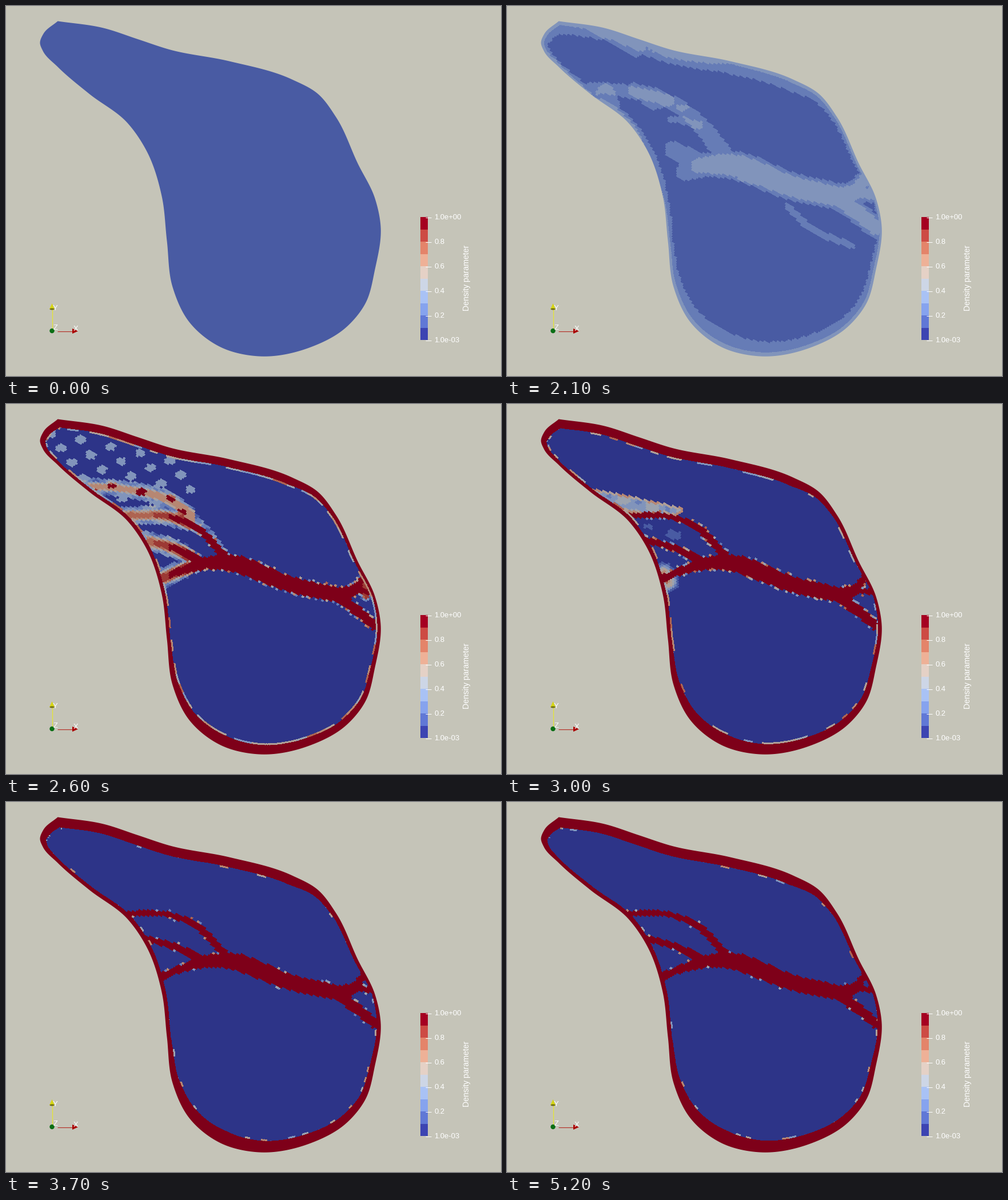
A matplotlib script for the animation above (8300 ms loop, 866 by 647 pixels).

```python
import numpy as np
import matplotlib.pyplot as plt
from matplotlib.animation import FuncAnimation
from matplotlib.colors import to_rgb
from matplotlib.patches import Circle, Ellipse, PathPatch, Polygon, Rectangle
from matplotlib.path import Path

W, H, DPI = 866, 647, 64
STEP, LOOP = 100, 8300
X0, X1, Y0, Y1 = 50, 666, 18, 622
BACK = "#c5c4b8"
BAR = ["#3c44b2", "#6078d6", "#86a3ee", "#a9c2f5", "#cdd6e6",
       "#e5d1c6", "#eeb197", "#e4846a", "#cd4b44", "#a50021"]
SHADE = 0.765  # the body is lit a little darker than its colour bar
PALETTE = np.array([to_rgb(c) for c in BAR]) * SHADE

# the solver saves a picture at these times; the field runs from 0 to 6
TIMES = np.array([0, 20, 21, 23, 24, 26, 29, 30, 31, 33, 35, 37, 39, 40,
                  43, 45, 48, 50, 51, 52]) * 100
POSITIONS = np.interp(TIMES, [1999, 2000, 2300, 2600, 3000, 3700, 5200], range(7))

BODY = [(90, 26), (170, 38), (230, 57.5), (285, 75.5), (390, 96), (500, 128),
        (545, 153), (577, 194), (615, 275), (645, 336), (655, 385), (645, 460),
        (628, 520), (595, 561), (530, 597), (442, 612), (375, 596), (320, 552),
        (291, 491), (281, 410), (272, 332), (245, 252), (212, 204), (145, 153),
        (90, 106), (64, 78), (59, 64), (65, 48), (90, 26)]

# struts as key points (x, y, half width)
TRUNK = [(335, 279, 9), (385, 277, 14), (500, 316, 14), (592, 336, 13)]
FORK = [[(590, 333, 12), (615, 319, 8), (624, 304, 5)],
        [(605, 325, 6), (640, 329, 5)],
        [(588, 342, 10), (615, 362, 9), (645, 388, 8)]]
UPPER = [(208, 195, 5), (285, 197, 5), (330, 214, 6), (382, 266, 7)]
MID = [(240, 238, 6), (290, 251, 6), (345, 277, 9)]
LOW = [(268, 307, 7), (310, 290, 7), (345, 280, 11)]
VEIN = [(145, 143, 3), (215, 150, 4), (285, 168, 5), (335, 205, 7), (385, 268, 9)]
SPUR = [(490, 350, 2), (530, 387, 3), (605, 420, 2)]
RIBS = [UPPER, MID, LOW]
SPINE = [TRUNK, *FORK]


def smooth(knots, sub):
    """Hermite curve through the knots, sub samples per span."""
    knots = np.array(knots, float)
    t = np.r_[0, np.cumsum(np.hypot(*np.diff(knots[:, :2], axis=0).T))]
    slope = np.gradient(knots, t, axis=0)
    s = (np.arange(sub) / sub)[None, :, None]
    h = np.diff(t)[:, None, None]
    p, q = knots[:-1, None], knots[1:, None]
    m, n = slope[:-1, None] * h, slope[1:, None] * h
    curve = ((2 * s**3 - 3 * s**2 + 1) * p + (s**3 - 2 * s**2 + s) * m
             + (3 * s**2 - 2 * s**3) * q + (s**3 - s**2) * n)
    return np.vstack([curve.reshape(-1, knots.shape[1]), knots[-1:]])


SUB = 20
outline = smooth(BODY, SUB)[:-1] + 0.5
knot = np.arange(len(outline)) / SUB


def bump(centre, spread):
    return np.exp(-((knot - centre) / spread) ** 2)


# rim thickness along the outline, final and early, with two late-filling gaps
wide = np.interp(knot, [0, 5, 7, 9, 11, 13, 16, 17, 19, 22, 24, 28],
                 [17.5, 17.5, 8, 5, 9, 15, 24, 19, 7, 8, 6, 17])
thin = 2 + 0.22 * wide
gap = 10 * (bump(3, 0.8) + bump(21.5, 1.3))

# pixel grid, distance to the outline and nearest outline sample
px, py = np.meshgrid(np.arange(X0, X1) + 0.5, np.arange(Y0, Y1) + 0.5)
px, py = px.astype(np.float32), py.astype(np.float32)
dist = np.full(px.shape, 1e9, np.float32)
near = np.zeros(px.shape, np.int32)
for i, (ox, oy) in enumerate(outline.astype(np.float32)):
    d2 = (px - ox) ** 2 + (py - oy) ** 2
    closer = d2 < dist
    np.copyto(dist, d2, where=closer)
    np.copyto(near, i, where=closer)
dist = np.sqrt(dist)

# tilted brick mesh
CW, CH, TILT = 4.4, 3.8, np.radians(30)
ca, sa = np.cos(TILT), np.sin(TILT)
row = np.floor((py * ca - px * sa) / CH).astype(int)
col = np.floor((px * ca + py * sa) / CW + row % 2 / 2).astype(int)
rows, cols = np.mgrid[row.min():row.max() + 1, col.min():col.max() + 1]
row, col = row - row.min(), col - col.min()
cu, cv = (cols + 0.5 - rows % 2 / 2) * CW, (rows + 0.5) * CH
cx, cy = cu * ca - cv * sa, cu * sa + cv * ca
at = (np.clip(cy - Y0, 0, Y1 - Y0 - 1).astype(int),
      np.clip(cx - X0, 0, X1 - X0 - 1).astype(int))
edge_dist, edge_near = dist[at], near[at]
wave = np.sin(cx / 9 + cy / 23) * np.sin(cy / 7 - cx / 31)


def noise(seed, shape=cx.shape):
    return np.random.default_rng(seed).random(shape)


def depth(*lines):
    """Depth of each cell inside the nearest strut, negative outside."""
    best = np.full(cx.shape, -999.0)
    for pts in lines:
        curve = smooth(pts, 5)
        for (ax, ay, aw), (bx, by, bw) in zip(curve, curve[1:]):
            dx, dy = bx - ax, by - ay
            t = np.clip(((cx - ax) * dx + (cy - ay) * dy) / (dx * dx + dy * dy), 0, 1)
            away = np.hypot(cx - ax - t * dx, cy - ay - t * dy)
            best = np.maximum(best, aw + t * (bw - aw) - away)
    return best


def glow(peak, fall, *lines):
    return peak * np.exp(-(np.clip(-depth(*lines), 0, None) / fall) ** 2)


spine, ribs = depth(*SPINE), depth(*RIBS)
neck = np.maximum(ribs, depth(VEIN))
reach = np.interp(cx, [300, 340], [34, 12])  # webbing is wider on the left


def struts(speckle, seed, core=1):
    d = np.maximum(spine, ribs)
    v = np.where(d > 0, np.where(spine > 0, 1, core), 0.03)
    loose = (d > -3) & (d < 0.5) & (noise(seed) < speckle)
    return np.where(loose, 0.25 + 0.5 * noise(seed + 50), v)


def first_patches():
    lit = depth([(100, 28, 1), (160, 42, 8), (222, 66, 22)],
                [(172, 150, 14), (185, 172, 12)],
                [(222, 146, 12), (262, 163, 17), (282, 166, 9)],
                [(300, 178, 5), (314, 176, 6)],
                [(288, 198, 6), (336, 207, 7)],
                [(405, 302, 5), (436, 306, 4)]) + 2 * wave > 0
    slice_ = 5 * (bump(4.8, 0.8) + bump(22, 0.7) + bump(24.5, 1.2))
    return np.where(lit | (edge_dist < slice_[edge_near]), 0.26, 0.16)


def haze():
    margin = edge_dist / (1.75 * wide[edge_near])
    cloudy = (spine > -16) | (neck > -reach) | (depth(SPUR) > -28) | (margin < 1)
    v = np.where(cloudy, 0.16, 0.02)
    v[neck > 4 - reach / 2] = 0.26
    rim = (0.55 + 0.18 * bump(3, 0.9))[edge_near] * (1 - margin**2)
    return np.max([v, rim, glow(0.67, 11, *SPINE), glow(0.56, 9, VEIN),
                   glow(0.35, 7, SPUR), glow(0.37, 16, MID[1:], LOW[1:])], axis=0)


def lattice():
    core = np.clip(0.76 + (cx - 250) / 250, 0.76, 1)
    web = np.where(neck > 6 - reach / 2, 0.3 + 0.13 * wave, 0)
    vein = glow(0.62, 5, VEIN) + 0.35 * (wave > 0.5)
    return np.max([struts(0.45, 4, core), web, np.where(neck == ribs, 0, vein) * (cx < 330),
                   core * glow(0.85, 6, *RIBS) * (cx < 320),
                   glow(0.86, 4, [(624, 314, 8), (630, 336, 3)])], axis=0)


def thinning():
    wedge = depth([(150, 152, 4), (215, 175, 14), (300, 187, 7)])
    web = np.where(wedge > 0, 0.38 + 0.1 * wave + 0.2 * (wedge < 4), 0)
    flecks = glow(0.17, 5, [(245, 212, 2), (300, 232, 4)]) * (wave > 0.1)
    foot = glow(0.6, 11, [(274, 296, 4), (281, 310, 5)])
    return np.max([struts(0.4, 5), web, flecks, foot], axis=0)


FIELDS = [np.full(cx.shape, 0.16), first_patches(), haze(), lattice(), thinning(),
          struts(0.12, 6), struts(0.07, 7)]
swap = noise(20)
dash = noise(21, len(outline))
tone = noise(22, len(outline))


def picture(pos):
    k = min(int(pos), len(FIELDS) - 2)
    f = pos - k
    a, b = FIELDS[k], FIELDS[k + 1]
    cells = np.where(swap < f, b, a) if pos > 5 else a + (b - a) * f
    v = cells[row, col]
    if pos > 1:
        grow = np.interp(pos, [2, 3, 4, 5, 6], [0, 0.7, 0.82, 0.97, 1])
        ramp = np.interp(pos, [2, 2.8], [6, 0.01])
        rim = thin + (wide - thin) * grow - gap * np.clip(3 - pos, 0, 1)
        inner = dist - rim[near]
        v = np.maximum(v, min(pos - 1, 1) * np.clip(1 - inner / ramp, 0, 1))
        share = np.interp(pos, [2, 3, 4, 5, 6], [0, 0.8, 0.4, 0.14, 0.1])
        seg = near // (5 if pos < 5 else 3)
        marked = ((dash + 0.05 * pos) % 1 < share)[seg]
        v = np.where(marked & (inner > 0) & (inner < 3), 0.3 + 0.45 * tone[seg], v)
    return PALETTE[np.clip(v * 10, 0, 9).astype(int)]


pictures = [picture(pos) for pos in POSITIONS]

fig = plt.figure(figsize=(W / DPI, H / DPI), dpi=DPI, facecolor=BACK)
ax = fig.add_axes([0, 0, 1, 1])
ax.axis("off")
image = ax.imshow(pictures[0], extent=(X0, X1, Y1, Y0), interpolation="nearest",
                  aspect="auto")
ax.set_xlim(0, W)
ax.set_ylim(H, 0)

# background with the body cut out, for a clean edge
left, right, top, bottom = X0 - 2, X1 + 2, Y0 - 2, Y1 + 2
sheet = [(left, top), (left, bottom), (right, bottom), (right, top), (left, top)]
hole = Path(np.vstack([outline, outline[:1]]), closed=True)
mask = Path.make_compound_path(Path(sheet, closed=True), hole)
ax.add_patch(PathPatch(mask, fc=BACK, lw=0, zorder=2))


def label(x, y, text, size=13, **kw):
    ax.text(x, y, text, color="white", family="Liberation Sans",
            fontsize=size * 72 / DPI, zorder=6, **kw)


def line(xs, ys, color, width=1):
    ax.plot(xs, ys, color=color, lw=width * 72 / DPI, zorder=4,
            solid_capstyle="butt")


def shape(patch, color):
    patch.set(facecolor=color, linewidth=0, zorder=5)
    ax.add_patch(patch)


# colour bar
for i, color in enumerate(BAR):
    shape(Rectangle((725, 584 - 21.5 * (i + 1)), 13, 21.5), color)
for i, text in enumerate(["1.0e-03", "0.2", "0.4", "0.6", "0.8", "1.0e+00"]):
    y = 584.5 - 43 * i
    ax.plot([734, 744], [y, y], color="white", lw=72 / DPI, zorder=6,
            solid_capstyle="butt")
    label(749, y + 3.5, text)
label(806, 475, "Density parameter", 14, rotation=90, ha="center", va="center")

# orientation axes
line([80.5, 80.5], [565, 530], "#e6e632", 1.3)
shape(Polygon([(80.5, 520), (76, 530), (85, 530)]), "#d6d614")
shape(Ellipse((80.5, 530), 8, 3), "#6e6e14")
line([90, 118], [568.5, 568.5], "#b43228", 1.2)
shape(Polygon([(116, 564), (116, 573), (126, 568.5)]), "#aa0000")
shape(Circle((80.5, 568), 4.2), "#0a6e14")
for x, y, text in [(82, 531.5, "Y"), (118, 568, "X"), (82.5, 566.5, "Z")]:
    label(x, y, text)


def update(n):
    image.set_data(pictures[np.searchsorted(TIMES, n * STEP, side="right") - 1])
    return [image]


anim = FuncAnimation(fig, update, frames=LOOP // STEP, interval=STEP,
                     repeat=True, repeat_delay=0, blit=False)
plt.show()
```
